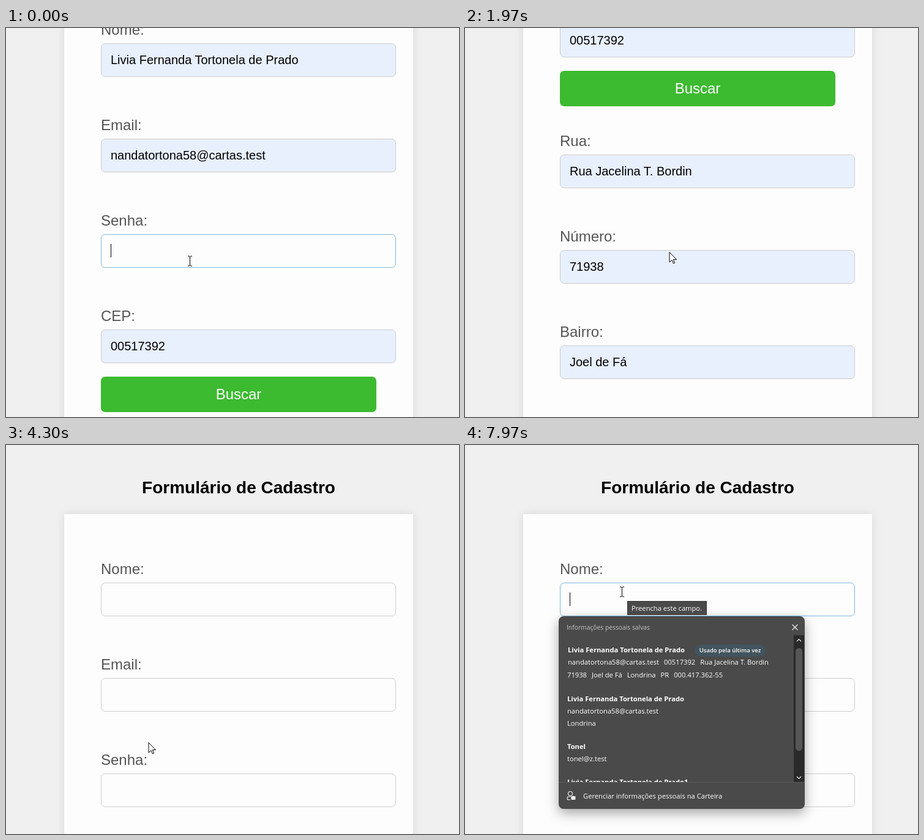
An HTML page for the animation above (8 s loop, 740 by 636 pixels).

```html
<!DOCTYPE html>
<html lang="pt-BR">
<head>
<meta charset="utf-8">
<title>Formulário de Cadastro</title>
<style>
  html, body { margin: 0; width: 100%; height: 100%; overflow: hidden; }
  body { position: relative; background: #f0f0f0; font: 20px "Liberation Sans", Arial, sans-serif; color: #000; }
  body * { position: absolute; box-sizing: border-box; white-space: pre; }
  [hidden] { display: none; }
  svg { overflow: visible; fill: none; stroke: #000; }
  #page { left: 0; top: 0; width: 740px; height: 2036px; }
  h1 { margin: 0; left: 95px; width: 570px; top: 54px; font-size: 28px; line-height: 32px; text-align: center; }
  #card { left: 95px; top: 113px; width: 570px; height: 1980px; background: #fdfdfd; box-shadow: 0 0 15px rgba(0, 0, 0, .1); }
  .label { left: 155px; font-size: 24px; line-height: 28px; color: #555; }
  .field { left: 155px; width: 482px; height: 55px; line-height: 53px; padding-left: 15px; border: 1px solid #ccc; border-radius: 7px; }
  .field.filled { background: #e8f0fe; }
  .field.focus { border-color: #80b8e0; }
  .date { height: 58px; font: 18.3px/56px "Noto Sans Mono", monospace; }
  .date * { position: static; padding: 0 1px; }
  .date i { font-style: normal; padding: 0 .5px; }
  #search { left: 155px; top: 770px; width: 450px; height: 58px; border-radius: 7px; background: #3cba30; color: #fff; font-size: 24px; line-height: 58px; text-align: center; }
  #search.hover { background: #2f9a1c; }
  #submit { left: 155px; top: 1951px; width: 111px; height: 32px; border: 1px solid #767676; border-radius: 3px; background: #efefef; line-height: 30px; text-align: center; }
  #caret { width: 1.5px; height: 22px; background: #000; }

  #popup { left: 153px; top: 280px; width: 402px; height: 315px; border-radius: 8px; background: #4a4a4a; color: #fff; box-shadow: 0 7px 20px rgba(0, 0, 0, .35); }
  #popup, #tip { font: 11.2px/20px "Open Sans", "Noto Sans", sans-serif; }
  #popup b { font-weight: 700; }
  #popup svg { left: 0; top: 0; stroke: #f4f4f4; }
  #head { left: 13px; top: 8px; font-size: 10.3px; color: #c4c4c4; }
  #list { left: 0; top: 31px; width: 384px; height: 240px; overflow: hidden; }
  #list span { position: static; margin-right: 8px; }
  #badge { left: 222px; top: 46px; width: 116px; height: 20px; border-radius: 10px; background: #42545e; font-size: 9.5px; font-weight: 600; text-align: center; }
  #track { left: 384px; top: 31px; width: 17px; height: 240px; background: #2a2a2a; }
  #thumb { left: 3px; top: 21px; width: 11px; height: 168px; border-radius: 6px; background: #565656; }
  #foot { left: 0; top: 271px; width: 402px; height: 44px; border-top: 1px solid #5c5c5c; padding: 12px 0 0 40px; }
  #tip { left: 265px; top: 255px; width: 130px; height: 23px; line-height: 22px; background: #4a4a4a; color: #fff; border: 1px solid #363636; padding-left: 6px; }
  #mouse { left: 0; top: 0; width: 1px; height: 1px; }
</style>
</head>
<body>
<div id="page">
  <h1>Formulário de Cadastro</h1>
  <div id="card"></div>
  <div id="search">Buscar</div>
  <div id="submit">Cadastrar</div>
  <div id="caret"></div>
  <svg id="eye" style="left:603px;top:564px" width="1" height="1" stroke-width="1.8">
    <path d="M-12 2C-9-11 9-11 12 2"/><circle cy="3" r="5"/>
  </svg>
  <svg style="left:608px;top:1716px" width="1" height="1" stroke-width="1.7">
    <rect x="-8.5" y="-8.5" width="17" height="17" rx="3"/>
    <path d="M-8-4H8M-5 0h2m2 0h2m2 0h2M-5 4h2m2 0h2" stroke-width="2"/>
  </svg>
</div>

<div id="popup">
  <div id="head">Informações pessoais salvas</div>
  <div id="list"></div>
  <div id="badge">Usado pela última vez</div>
  <div id="track"><div id="thumb"></div></div>
  <div id="foot">Gerenciar informações pessoais na Carteira</div>
  <svg width="1" height="1" stroke-width="1.1">
    <path d="M381.500 13.500l9 9m0-9l-9 9M389 41l3.500-3.500 3.500 3.500M389 262l3.500 3.500 3.500-3.500"/>
    <circle cx="19" cy="290" r="3.500"/>
    <path d="M19 300h-3q-2 0-2-2v-1q0-2 2-2h4"/>
    <rect x="21" y="294.500" width="6" height="5" rx="1" fill="#f4f4f4"/>
  </svg>
</div>
<div id="tip">Preencha este campo.</div>

<svg id="mouse">
  <path id="arrow" d="M.5.5V17l4-3.700L7 19l2.200-1-2.400-5.500H12Z" fill="#fff"/>
  <path id="hand" d="M-1 2a2 2 0 0 1 4 0v5l6 1.500q2 .7 2 3l-.5 5-1.500 3v3H0v-2l-5-7q-1-2 .5-2.500 1-.3 3.500 2.500ZM3 7v4M6 8v3M9 9v2" fill="#fff"/>
  <path id="text" d="M-3.500-8H-1L0-7 1-8H3.500M0-7V7M-3.500 8H-1L0 7 1 8H3.500"/>
</svg>

<script>
const LOOP = 8000, RESET = 3800, FOCUS_NAME = 5600, TIP = 7550;
const BLINK = 530, TYPE_START = 100, TYPE_STEP = 110, PASSWORD_LENGTH = 6;

const person = "Livia Fernanda Tortonela de Prado";
const email = "nandatortona58@cartas.test";
const zip = "00517392", street = "Rua Jacelina T. Bordin", number = "71938";
const district = "Joel de Fá", city = "Londrina", cpf = "000.417.362-55";
const date = "<span>31</span><i>/</i><span>10</span><i>/</i><span>2024</span>";

const $ = id => document.getElementById(id);
function add(parent, className, top, html, tag = "div") {
  const element = document.createElement(tag);
  element.className = className;
  element.style.top = top + "px";
  element.innerHTML = html;
  return parent.appendChild(element);
}

// Label text, top of the input box, value
const fields = [
  ["Nome", 225, person], ["Email", 381, email], ["Senha", 537, ""], ["CEP", 693, zip],
  ["Rua", 907, street], ["Número", 1063, number], ["Bairro", 1219, district],
  ["Cidade", 1375, city], ["Estado", 1531, "PR"],
  ["Data de Nascimento", 1687, date], ["CPF", 1846, cpf],
].map(([label, top, value]) => {
  add($("page"), "label", top - 36, label + ":");
  const box = add($("page"), "field", top, "");
  const isDate = value === date;
  box.classList.toggle("date", isDate);
  return { box, value, isDate };
});
const [nameField, , passwordField] = fields;
$("page").append($("caret"), ...$("page").querySelectorAll("svg"));

const spans = (...parts) => parts.map(part => `<span>${part}</span>`).join("");
[
  [14, person, "b"], [34, spans(email, zip, street)], [55, spans(number, district, city, "PR", cpf)],
  [94, person, "b"], [114, email], [134, city],
  [172, "Tonel", "b"], [192, "tonel@z.test"],
  [230, person + "1", "b"],
].forEach(([top, html, tag], i) => {
  add($("list"), "", top, html, tag).style.left = (i < 2 ? 15 : 14) + "px";
});

const scrollKeys = [
  [0, 200], [850, 200], [1200, 400], [1580, 400], [1950, 700],
  [1990, 700], [2850, 1400], [3750, 1400], [4250, 0], [LOOP, 0],
];
const mouseKeys = [
  [0, 300, 381], [800, 300, 381], [1100, 333, 372], [1580, 333, 372], [1650, 333, 366],
  [3430, 333, 366], [3650, 215, 570], [3900, 215, 570], [4900, 262, 333], [5300, 262, 333],
  [5560, 253, 277], [6800, 253, 277], [7050, 256, 240], [LOOP, 256, 240],
];
const cursorKeys = [[0, "text"], [1180, "hand"], [1620, "arrow"], [5540, "text"]];

function sample(keys, t) {
  const i = keys.findIndex(key => key[0] > t);
  const from = keys[i - 1], to = keys[i];
  const u = (t - from[0]) / (to[0] - from[0]);
  const eased = u * u * (3 - 2 * u);
  return from.slice(1).map((value, k) => value + (to[k + 1] - value) * eased);
}

function draw() {
  const t = performance.now() % LOOP;
  const isReset = t >= RESET, nameFocused = t >= FOCUS_NAME;

  const [scroll] = sample(scrollKeys, t);
  $("page").style.transform = `translateY(${-Math.round(scroll)}px)`;

  const typed = isReset ? 0 : Math.max(0, Math.min(PASSWORD_LENGTH, Math.floor((t - TYPE_START) / TYPE_STEP) + 1));
  for (const { box, value, isDate } of fields) {
    const content = isReset ? "" : value;
    if (box.dataset.content !== content) box.innerHTML = box.dataset.content = content;
    box.classList.toggle("filled", content !== "" && !isDate);
  }
  passwordField.box.textContent = "•".repeat(typed);
  passwordField.box.classList.toggle("focus", !isReset);
  nameField.box.classList.toggle("focus", nameFocused);
  $("eye").style.display = typed ? "" : "none";

  const lastKey = typed ? TYPE_START + (typed - 1) * TYPE_STEP : 0;
  const blinkStart = nameFocused ? FOCUS_NAME : lastKey;
  const caretOn = (!isReset || nameFocused) && (t - blinkStart) % (2 * BLINK) < BLINK;
  $("caret").hidden = !caretOn;
  $("caret").style.left = 170.5 + typed * 7 + "px";
  $("caret").style.top = (nameFocused ? 241 : 553) + "px";

  $("popup").hidden = !nameFocused;
  $("tip").hidden = t < TIP;

  const [x, y] = sample(mouseKeys, t);
  const cursor = cursorKeys.filter(key => key[0] <= t).pop()[1];
  $("mouse").style.transform = `translate(${Math.round(x) + .5}px, ${Math.round(y)}px)`;
  for (const kind of ["arrow", "hand", "text"]) $(kind).style.display = kind === cursor ? "" : "none";
  $("search").classList.toggle("hover", cursor === "hand");

  requestAnimationFrame(draw);
}
requestAnimationFrame(draw);
</script>
</body>
</html>
```
